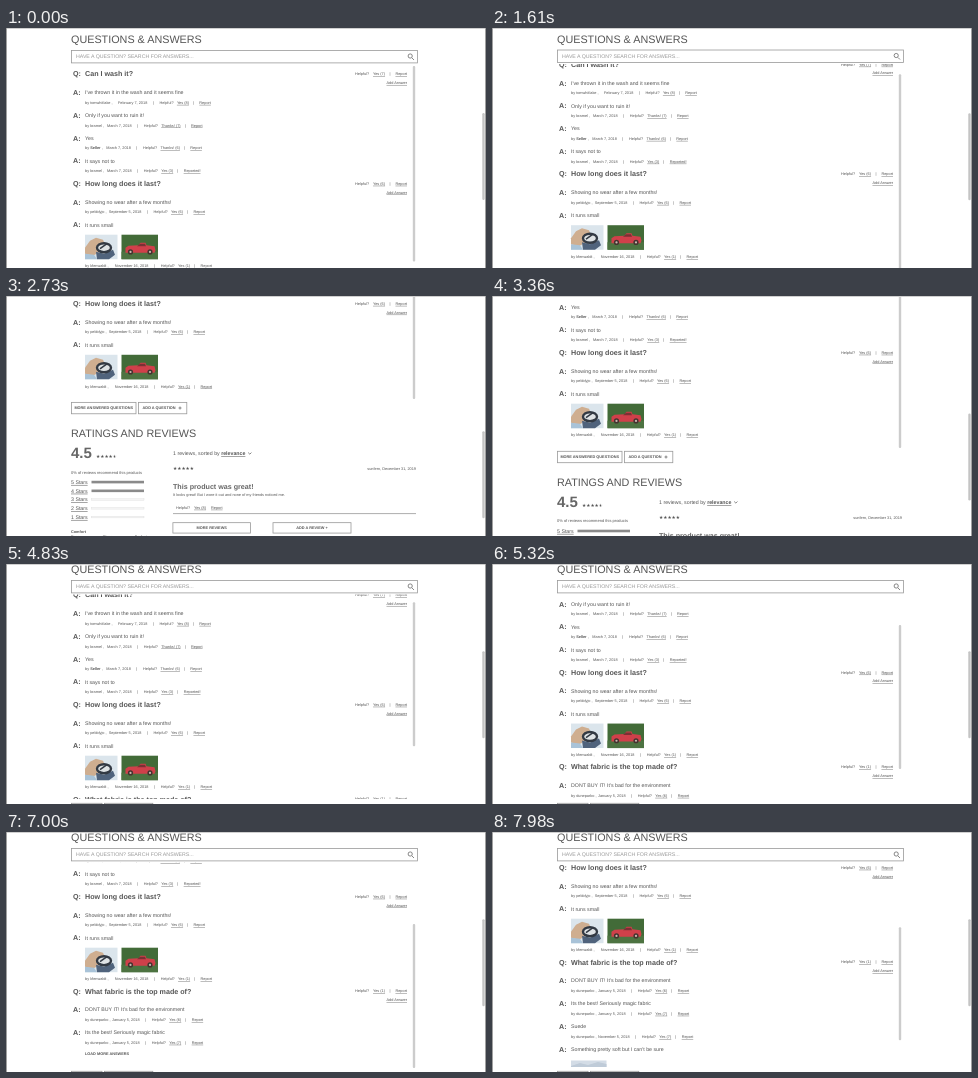
Animation, 480 px wide and 240 px high, one loop 8000 ms. Source, as an HTML page:

```html
<!DOCTYPE html>
<html lang="en">
<head>
<meta charset="utf-8">
<title>Questions and answers</title>
<style>
html, body { margin: 0; width: 100%; height: 100%; overflow: hidden; background: #fff; }
svg { display: block; }
text { font-family: "Liberation Sans", Arial, sans-serif; fill: #555; white-space: pre; text-rendering: geometricPrecision; }
.b { font-weight: bold; }
.u { text-decoration: underline; text-decoration-color: #999; text-decoration-thickness: .4px; }
.stars { font-family: "DejaVu Sans", sans-serif; }
</style>
</head>
<body>
<svg id="stage" width="480" height="240" viewBox="0 0 480 240">
  <defs>
    <clipPath id="window"><rect x="60" y="36.5" width="352" height="204.5"/></clipPath>
    <linearGradient id="score"><stop offset=".9" stop-color="#555"/><stop offset=".9" stop-color="#ccc"/></linearGradient>
  </defs>
  <g id="page">
    <g clip-path="url(#window)"><g id="list"></g></g>
  </g>
  <rect id="pageBar" x="476.3" width="2.4" height="87" rx="1.2" fill="#c4c4c4"/>
  <path d="M0 .5H480" stroke="#d0d0d0"/>
  <path d="M.5 0V240M479.5 0V240" stroke="#a1a1a1"/>
</svg>
<script>
const $ = id => document.getElementById(id);
const page = $('page'), list = $('list');
const SMALL = 3.85, BODY = 5.25, HEAD = 7.15, TITLE = 10.8;

function add(parent, tag, attrs, content) {
  const el = document.createElementNS('http://www.w3.org/2000/svg', tag);
  for (const k in attrs) el.setAttribute(k, attrs[k]);
  if (content) el.textContent = content;
  parent.append(el);
  return el;
}
// y is the middle of the capitals
const text = (g, x, y, size, str, attrs = {}) =>
  add(g, 'text', { x, y: y + size * .36, 'font-size': size, ...attrs }, str);
const rect = (g, x, y, width, height, fill, more = {}) =>
  add(g, 'rect', { x, y, width, height, fill, ...more });
const path = (g, d, fill, more = {}) => add(g, 'path', { d, fill, ...more });
const group = g => add(g, 'g', {});
const bold = { class: 'b' }, under = { class: 'u' }, border = { stroke: '#999', 'stroke-width': .8 };

function button(g, x, y, w, h, label, plus) {
  const box = rect(g, x, y, w, h, '#fff', border);
  const mid = x + w / 2 - (plus ? 3.5 : 0);
  text(g, mid, y + h / 2, SMALL, label, { class: 'b', 'text-anchor': 'middle' });
  if (plus) text(g, x + w - 8.5, y + h / 2, 6, '+', bold);
  return box;
}

function question(g, y, title, votes) {
  text(g, 67, y, HEAD, 'Q:', bold);
  text(g, 79, y, HEAD, title, bold);
  text(g, 349, y, SMALL, 'Helpful?');
  text(g, 367, y, SMALL, `Yes (${votes})`, under);
  text(g, 383.5, y, SMALL, '|');
  text(g, 401, y, SMALL, 'Report', { class: 'u', 'text-anchor': 'end' });
  text(g, 401, y + 8.8, SMALL, 'Add Answer', { class: 'u', 'text-anchor': 'end' });
}

function answer(g, y, body, name, dateX, date, vote, report = 'Report', gap = 10) {
  text(g, 67, y, HEAD, 'A:', bold);
  text(g, 79, y, BODY, body);
  if (!name) return;
  const row = text(g, 79, y + gap, SMALL, 'by ');
  const span = (str, attrs) => add(row, 'tspan', attrs, str);
  span(name, name === 'Seller' ? bold : {});
  span(' ,');
  span(date, { x: dateX });
  span('|', { dx: 5.4 });
  span('Helpful?', { dx: 5.8 });
  span(vote, { dx: 3.3, class: 'u' });
  span('|', { dx: 4 });
  span(report, { dx: 5.4, class: 'u' });
}

function photos(g, y) {
  rect(g, 79, y, 32.5, 24.5, '#dbe5ec');
  path(g, `M79 ${y + 13}l5-7 6-3 7 2 3 7-8 6-5 3-8-2z`, '#cfae90');
  path(g, `M79 ${y + 19}l9 1 3 4.500H79z`, '#a9c3d8');
  path(g, `M90 ${y + 17}l8 2 9-4 2 5-6 4.500H91z`, '#50637c');
  add(g, 'ellipse', { cx: 98, cy: y + 13, rx: 7, ry: 4.5, fill: '#dfe3e5', stroke: '#333a44', 'stroke-width': 2.4 });
  path(g, `M94 ${y + 14}l7-5`, 'none', { stroke: '#333a44', 'stroke-width': 1.6 });
  rect(g, 115.5, y, 36.5, 24.5, '#426b38');
  rect(g, 115.5, y + 17, 36.5, 7.5, '#4d7341');
  path(g, `M119.500 ${y + 18}v-5l3-2 10-.5 2-2.500h5l1 2.500 8 1 1 4-1 2.500z`, '#d0404a');
  path(g, `M131 ${y + 11.5}h9l-1-2.500h-5z`, '#7c3034');
  for (const cx of [124.5, 144]) {
    add(g, 'circle', { cx, cy: y + 17.2, r: 2.6, fill: '#44332f' });
    add(g, 'circle', { cx, cy: y + 17.2, r: 1.1, fill: '#c9b8b0' });
  }
}

// Heading and search box
text(page, 65, 11.5, TITLE, 'QUESTIONS & ANSWERS');
rect(page, 65.4, 22.5, 346, 12.4, '#fff', border);
text(page, 70, 28.3, 5.24, 'HAVE A QUESTION? SEARCH FOR ANSWERS...', { style: 'fill:#999' });
path(page, 'M406 30l2 2M406.300 28a2.100 2.100 0 1 1-4.200 0a2.100 2.100 0 1 1 4.200 0', 'none', { stroke: '#555', 'stroke-width': .7 });
const listBar = rect(page, 406.8, 0, 2.4, 0, '#ccc', { rx: 1 });

// Questions
question(list, 45.8, 'Can I wash it?', 7);
answer(list, 64.5, "I've thrown it in the wash and it seems fine", 'tomwhitlake', 112, 'February 7, 2018', 'Yes (8)');
answer(list, 87.2, 'Only if you want to ruin it!', 'bramel', 101, 'March 7, 2018', 'Thanks! (7)');
answer(list, 110, 'Yes', 'Seller', 100.3, 'March 7, 2018', 'Thanks! (6)');
answer(list, 132.8, 'It says not to', 'bramel', 101, 'March 7, 2018', 'Yes (3)', 'Reported!');
question(list, 155.4, 'How long does it last?', 6);
answer(list, 174, 'Showing no wear after a few months!', 'pebblyjo', 102.7, 'September 5, 2018', 'Yes (6)');
answer(list, 196.8, 'It runs small', 'kfenwaldt', 108.7, 'November 16, 2018', 'Yes (1)', 'Report', 41.3);
photos(list, 206.7);

const third = group(list);
question(third, 250, 'What fabric is the top made of?', 1);
answer(third, 268.6, "DONT BUY IT! It's bad for the environment", 'duneparko', 106, 'January 5, 2018', 'Yes (6)');
answer(third, 291.4, 'Its the best! Seriously magic fabric', 'duneparko', 106, 'January 5, 2018', 'Yes (7)');
const loadMore = text(third, 79, 312.5, SMALL, 'LOAD MORE ANSWERS', bold);
const extra = group(list);
answer(extra, 314.6, 'Suede', 'duneparko', 106, 'November 5, 2018', 'Yes (7)');
answer(extra, 337.6, "Something pretty soft but I can't be sure");
rect(extra, 79, 348.5, 35.5, 24, '#d3dce6');
path(extra, 'M79 354l9-3 8 2 10-3 8.500 2v4H79z', '#bfcbd8');

// Buttons under the list
const moreButtons = group(page), fewButtons = group(page);
const moreBox = button(moreButtons, 65.4, 245.3, 64.6, 11.4, 'MORE ANSWERED QUESTIONS');
button(moreButtons, 132.4, 245.3, 48.4, 11.4, 'ADD A QUESTION', true);
button(fewButtons, 65.4, 245.3, 30.6, 11.4, 'COLLAPSE');
button(fewButtons, 98.4, 245.3, 48.4, 11.4, 'ADD A QUESTION', true);

// Ratings
text(page, 65, 276, TITLE, 'RATINGS AND REVIEWS');
text(page, 65, 296, 15, '4.5', { class: 'b', style: 'fill:#666' });
text(page, 90, 299.2, 4.7, '★★★★★', { class: 'stars', style: 'fill:url(#score)' });
text(page, 65, 315, 4, '0% of reviews recommend this products');
for (let i = 0; i < 5; i++) {
  const y = 325 + i * 8.75;
  text(page, 65, y, BODY, `${5 - i} Stars`, under);
  if (i < 2) rect(page, 85.5, y - 1.3, 52.5, 2.6, '#8a8a8a');
  else rect(page, 85.5, y - .8, 52.5, 1.6, '#f4f4f4', { stroke: '#ddd', 'stroke-width': .4 });
}
function scale(y, name, mark) {
  text(page, 65, y, SMALL, name, bold);
  text(page, 65, y + 4.7, SMALL, 'Poor');
  text(page, 101, y + 4.7, SMALL, 'Okay', { 'text-anchor': 'middle' });
  text(page, 141, y + 4.7, SMALL, 'Perfect', { 'text-anchor': 'end' });
  for (const x of [65, 90, 115]) rect(page, x, y + 9, 23.5, 5, '#eee');
  path(page, `M${mark - 2} ${y + 8.5}h4l-2 4z`, '#777');
}
scale(375, 'Comfort', 138.5);
scale(396, 'Quality', 119.5);

// Review
const sort = text(page, 167, 296.3, BODY, '1 reviews, sorted by ');
add(sort, 'tspan', { class: 'b u' }, 'relevance');
path(page, 'M242.200 295.500l1.600 1.600 1.600-1.600', 'none', { stroke: '#666', 'stroke-width': .8 });
text(page, 167, 311.2, 4.7, '★★★★★', { class: 'stars' });
text(page, 410, 311.2, SMALL, 'sunfern, December 31, 2019', { 'text-anchor': 'end' });
text(page, 167, 329.3, HEAD, 'This product was great!', { class: 'b', style: 'fill:#666' });
text(page, 167, 338, SMALL, 'It looks great! But I wore it out and none of my friends noticed me.');
text(page, 170, 350.3, SMALL, 'Helpful?');
text(page, 188, 350.3, SMALL, 'Yes (8)', under);
text(page, 205, 350.3, SMALL, 'Report', under);
rect(page, 167, 356.2, 243, .8, '#999');
button(page, 166.9, 365.6, 77.6, 10.4, 'MORE REVIEWS');
button(page, 267, 365.6, 78, 10.4, 'ADD A REVIEW +');

// Scrolls: start, end, from, to
const pageMoves = [[1590, 2240, 0, 175], [2380, 2870, 175, 130], [2940, 3360, 130, 90], [4270, 4550, 90, 6]];
const listMoves = [[490, 840, 0, 9], [5040, 5530, 9, 62], [5740, 6090, 62, 85], [7700, 7980, 85, 114]];
function scrollAt(moves, t) {
  let pos = 0;
  for (const [start, end, from, to] of moves) {
    if (t < start) break;
    const k = Math.min(1, (t - start) / (end - start));
    pos = from + (to - from) * k * k * (3 - 2 * k);
  }
  return pos;
}

const show = (el, on) => el.setAttribute('display', on ? 'inline' : 'none');
const LOOP = 8000, STEP = 70, TOP = 38, VIEW = 204;

function draw(now) {
  const t = Math.floor(now % LOOP / STEP) * STEP;
  const expanded = t >= 4340, loaded = t >= 7350;
  const y = scrollAt(pageMoves, t), inner = scrollAt(listMoves, t);
  page.setAttribute('transform', `translate(0 ${-y})`);
  list.setAttribute('transform', `translate(0 ${-inner})`);
  show(third, expanded);
  show(fewButtons, expanded);
  show(moreButtons, !expanded);
  show(loadMore, !loaded);
  show(extra, loaded);
  moreBox.setAttribute('stroke', t >= 3780 ? '#666' : border.stroke);
  const ratio = VIEW / (loaded ? 368 : expanded ? 289 : 213);
  listBar.setAttribute('y', TOP + inner * ratio);
  listBar.setAttribute('height', VIEW * ratio);
  $('pageBar').setAttribute('y', 85 + y / 2.77);
  requestAnimationFrame(() => draw(performance.now()));
}
draw(0);
</script>
</body>
</html>
```
